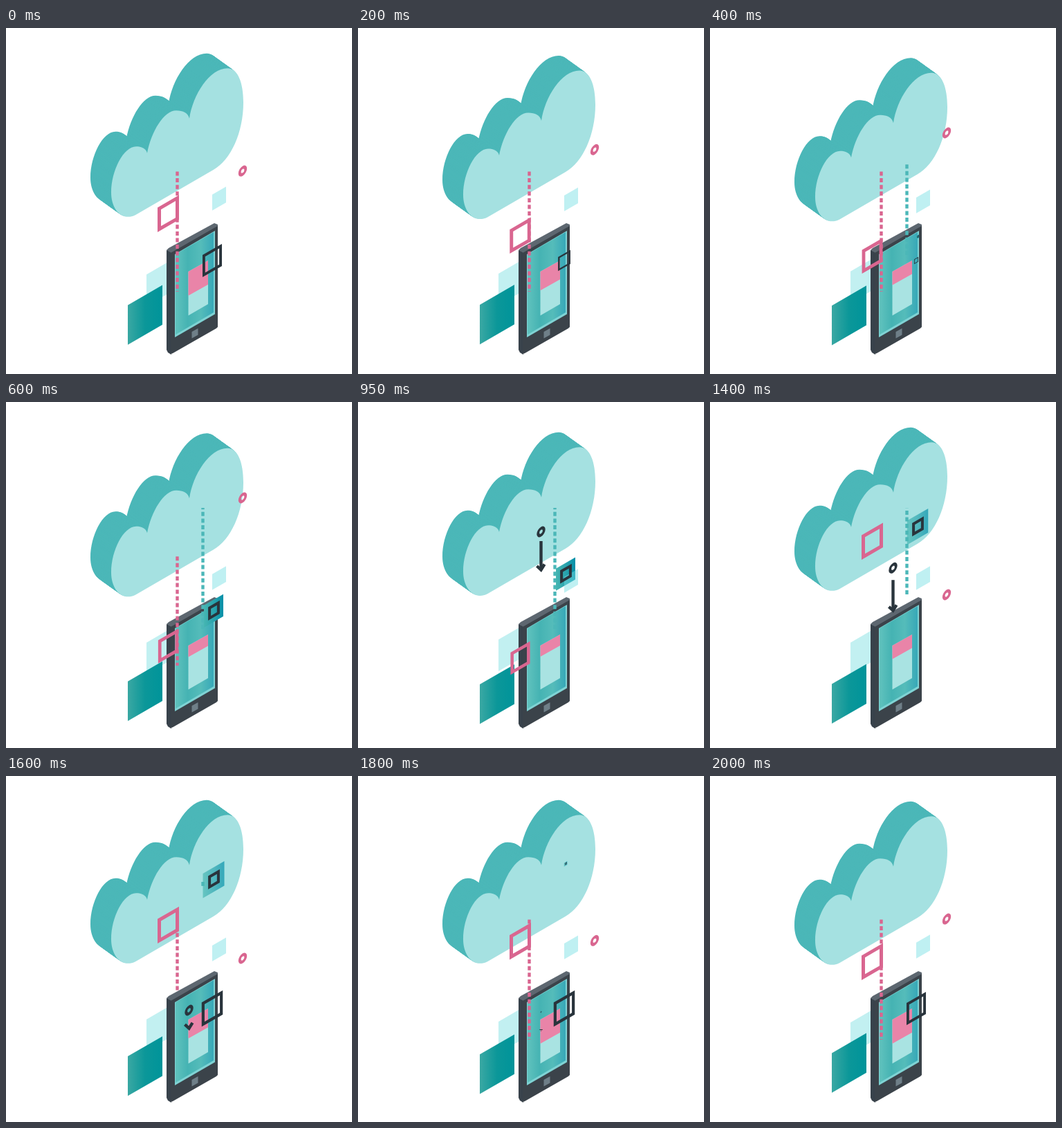
An HTML page with a canvas for the animation above (2050 ms loop, 500 px wide and 500 px high).

```html
<!DOCTYPE html>
<html lang="en">
<head>
<meta charset="utf-8">
<title>Cloud sync</title>
<style>
html, body { margin: 0; width: 100%; height: 100%; overflow: hidden; background: #fff; }
canvas { display: block; }
</style>
</head>
<body>
<canvas id="stage" width="500" height="500"></canvas>
<script>
const ctx = document.getElementById('stage').getContext('2d');
const LOOP = 2050, STEP = 50, PERIOD = 2000;
const PINK = '#d96690', DARK = '#29343c', TEAL = '#4bb7b8';
const cloud = new Path2D('M152 237C152 205 170 170.5 188 170.5C196 170.5 202 173 204 180C210 149 228 118.5 246 118.5C256 118.5 263 122 265 130C270 96 294 57.5 320 57.5C335 57.5 343 78 343 107C343 150 325 190 300 204L187 269.5C168 279 152 262 152 237Z');

const clamp = p => Math.max(0, Math.min(1, p));
const ramp = (t, a, b) => clamp((t - a) / (b - a));
const sine = p => (1 - Math.cos(Math.PI * p)) / 2;
const cubic = p => p < .5 ? 4 * p ** 3 : 1 - 4 * (1 - p) ** 3;
const mix = (a, b, p) => a + (b - a) * p;
const wave = (t, shift) => Math.sin(2 * Math.PI * (t - shift) / PERIOD);
// Time counted so that a motion starting at "from" may run past the loop end.
const after = (t, from) => t < from ? t + PERIOD : t;

function poly(fill, ...xy) {
  ctx.fillStyle = fill;
  ctx.beginPath();
  for (let i = 0; i < xy.length; i += 2) ctx.lineTo(xy[i], xy[i + 1]);
  ctx.closePath();
  ctx.fill();
}

function gradient(x0, x1, ...colors) {
  const g = ctx.createLinearGradient(x0, 0, x1, 0);
  colors.forEach((c, i) => g.addColorStop(i / (colors.length - 1), c));
  return g;
}

// Draws in the plane of the phone's front face, centred on x, y.
function iso(x, y, scale, draw) {
  if (scale < .01) return;
  ctx.save();
  ctx.translate(x, y);
  ctx.scale(scale, scale);
  ctx.transform(1, -.577, 0, 1.145, 0, 0);
  draw();
  ctx.restore();
}

function tile(x, y, size, fill, scale = 1) {
  iso(x, y, scale, () => {
    ctx.fillStyle = fill;
    ctx.fillRect(-size / 2, -size / 2, size, size);
  });
}

function frame(x, y, size, width, color, scale) {
  iso(x, y, scale, () => {
    ctx.strokeStyle = color;
    ctx.lineWidth = width;
    const s = size - width;
    ctx.strokeRect(-s / 2, -s / 2, s, s);
  });
}

function ring(x, y, color, scale) {
  iso(x, y, scale, () => {
    ctx.strokeStyle = color;
    ctx.lineWidth = 3.8;
    ctx.beginPath();
    ctx.arc(0, 0, 4.3, 0, 7);
    ctx.stroke();
  });
}

// Dashes are counted from the "from" end.
function line(x, from, to, color, width, dash = []) {
  if (Math.abs(to - from) < .5) return;
  ctx.strokeStyle = color;
  ctx.lineWidth = width;
  ctx.setLineDash(dash);
  ctx.beginPath();
  ctx.moveTo(x, from);
  ctx.lineTo(x, to);
  ctx.stroke();
  ctx.setLineDash([]);
}

function drawCloud(t) {
  ctx.save();
  ctx.translate(-30, -21.5 + 5.5 * wave(t, 200) + 3.9);
  ctx.fillStyle = TEAL;
  for (let i = 0; i < 30; i++) {
    ctx.fill(cloud);
    ctx.translate(1, 21.5 / 30);
  }
  ctx.fillStyle = '#a5e1e1';
  ctx.fill(cloud);
  ctx.restore();
}

function drawPhone(t) {
  poly('#5d6770', 232, 321, 235, 318, 301, 282, 306, 284, 306, 290, 238, 328);
  poly('#38424b', 232, 321, 239, 325, 239, 472, 234, 469, 232, 465);
  poly('#3b434a', 238, 325, 306, 286, 306, 432, 304, 434, 241, 470, 238, 471);
  poly('#7fd3d4', 244, 327, 302, 293, 302, 413.5, 244, 447);
  poly(gradient(244, 300, '#62c3be', '#45b3b3', '#55bcba', '#37a8b8'),
    245, 327, 300, 295, 300, 411, 245, 443);
  poly('#6f7f88', 268.5, 439, 277.5, 434, 277.5, 443.5, 268.5, 448.5);

  const h = 16 + 20 * ((1 + wave(t, 1400)) / 2) ** 2.5;
  poly('#a9e3e2', 263.5, 352, 292, 336, 292, 399, 263.5, 415.5);
  poly('#e984a8', 263.5, 352, 292, 336, 292, 336 + h, 263.5, 352 + h);
}

function drawArrow(t) {
  const size = sine(ramp(t, 650, 850)) * (1 - sine(ramp(t, 1650, 1850)));
  if (size < .01) return;
  const fall = cubic(ramp(t, 1180, 1680));
  const tail = mix(201, 366, fall);
  const tip = mix(mix(203, 245, sine(ramp(t, 650, 900))), 369, cubic(ramp(t, 1120, 1690)));
  ring(264.5, mix(187.5, 341, fall), DARK, size);
  if (tip - 2 > tail) line(264.5, tail, tip - 2, DARK, 4.4);
  ctx.save();
  ctx.translate(264.5, tip);
  ctx.scale(size, size);
  ctx.strokeStyle = DARK;
  ctx.lineWidth = 4.4;
  ctx.beginPath();
  ctx.moveTo(-6, -8);
  ctx.lineTo(0, -2.5);
  ctx.lineTo(5, -10.5);
  ctx.stroke();
  ctx.restore();
}

function drawUpload(t) {
  const size = sine(ramp(t, 340, 580)) * (1 - sine(ramp(t, 1650, 1850)));
  const y = 301.8 - .152 * (mix(600, 1750, ramp(t, 600, 1750)) - 600);
  ctx.globalAlpha = mix(1, .68, ramp(t, 950, 1350));
  tile(300, y, mix(28, 31, ramp(t, 950, 1500)),
    gradient(-15, 15, '#48b7b2', '#2aa3ad', '#008ea8'), size);
  ctx.globalAlpha = 1;
  tile(308, 252.5 + 6 * wave(t, 500), 20, 'rgba(122,223,227,.48)');
  frame(300.5, y - .5, 16.8, 4, DARK, size);
}

function render(t) {
  ctx.clearRect(0, 0, 500, 500);
  drawCloud(t);
  tile(223, 361 + 6.5 * wave(t, 1500), 40, '#c2f0f1');
  drawPhone(t);
  tile(201, 418.6 + 4.5 * wave(t, 650), 50, gradient(-25, 25, '#3aa8a3', '#0b9799', '#00949a'));

  // Dashed trails
  line(284.5, mix(328, 153, sine(ramp(t, 1263, 1645))),
    mix(328, 153, sine(ramp(t, 200, 500))), TEAL, 4.4, [6, 3.6]);
  const trail = after(t, 1300);
  line(247.5, mix(207.5, 381, sine(ramp(trail, 2530, 2890))),
    mix(207.5, 381, sine(ramp(trail, 1430, 1730))), PINK, 4.4, [6, 3.6]);

  drawUpload(t);

  const square = after(t, 1125);
  frame(234.5, mix(198, 370, sine(ramp(square, 1250, 2950))), 31, 5, PINK,
    sine(ramp(square, 1150, 1330)) * mix(1, .91, ramp(square, 2000, 2950)) * (1 - ramp(square, 2950, 3100)));

  const box = after(t, 1350);
  frame(298, 336, 30.5, 4.2, DARK, sine(ramp(box, 1400, 1580)) * (1 - sine(ramp(box, 1857, 2627))));

  const dot = after(t, 1030);
  ring(342, mix(281, 137, sine(ramp(dot, 1280, 2690))), PINK,
    sine(ramp(dot, 1050, 1300)) * (1 - sine(ramp(dot, 2700, 2980))));

  drawArrow(t);
}

const start = performance.now();
function tick() {
  const t = (performance.now() - start) % LOOP;
  render(Math.floor(t / STEP) * STEP);
  requestAnimationFrame(tick);
}
tick();
</script>
</body>
</html>
```
